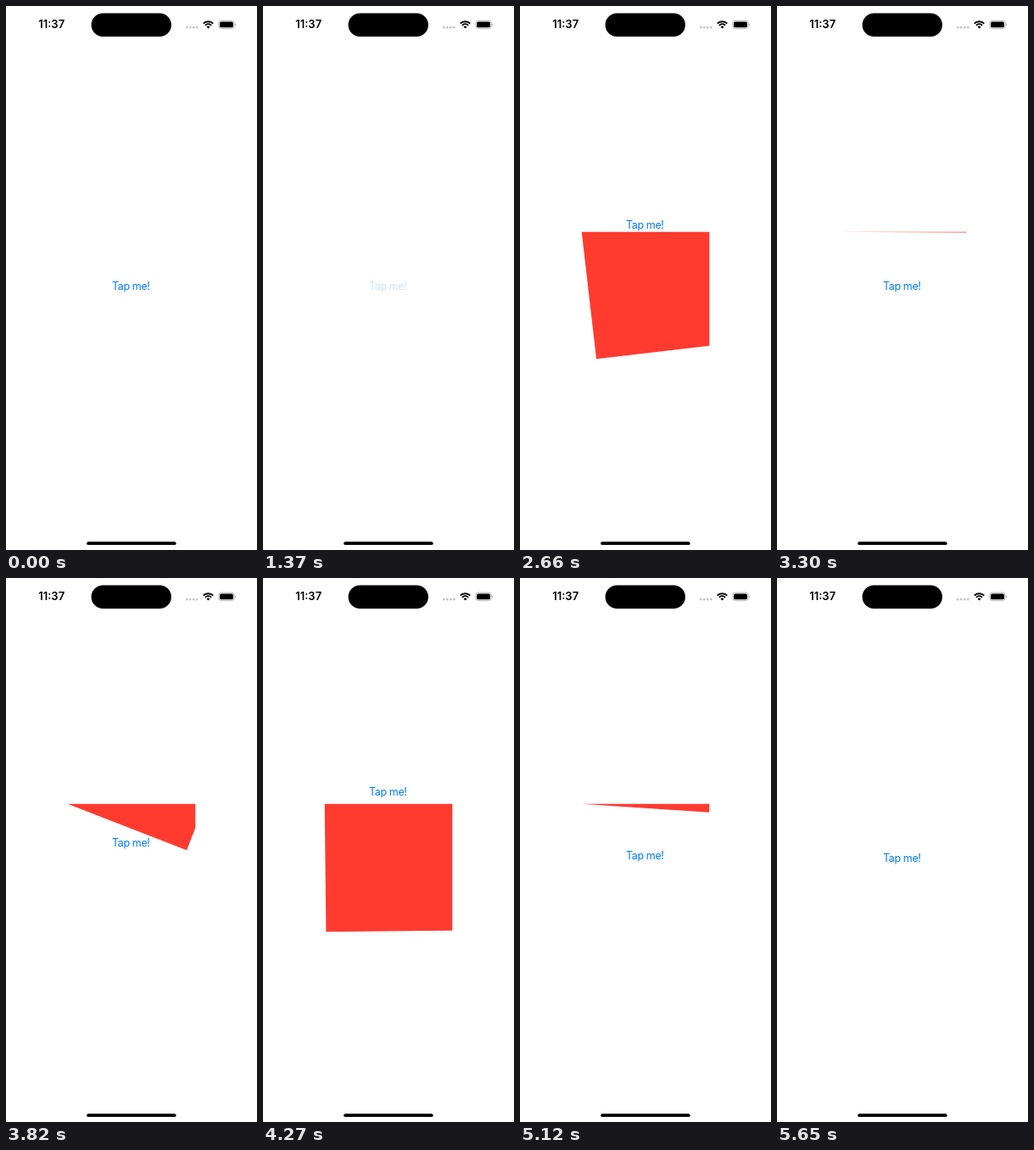
An HTML page that plays this animation: 296x640 px, repeating every 6250 ms.

```html
<!DOCTYPE html>
<html lang="en">
<head>
<meta charset="utf-8">
<title>Pivot transition</title>
<style>
  html, body { margin: 0; width: 100%; height: 100%; overflow: hidden; background: #fff; }
  svg { display: block; width: 296px; height: 640px; }
  text { font-family: Inter, "Noto Sans", sans-serif; text-anchor: middle; }
  .time { font-size: 13px; font-weight: 600; }
  .button { font-size: 12.5px; letter-spacing: -0.4px; fill: #007aff; }
</style>
</head>
<body>
<svg viewBox="0 0 296 640">
  <!-- status bar -->
  <text class="time" x="53.7" y="26.4">11:37</text>
  <rect x="100.6" y="8.5" width="94.3" height="27.6" rx="13.8"/>
  <path d="M213.3 25.2h12.1" fill="none" stroke="#c3c3c5" stroke-width="2.8" stroke-linecap="round" stroke-dasharray="0 4"/>
  <g transform="translate(238.5 26.4)">
    <path d="M-5.8-5.8A8.2 8.2 0 0 1 5.8-5.8M-3.6-3.6A5.1 5.1 0 0 1 3.6-3.6" fill="none" stroke="#000" stroke-width="1.9"/>
    <path d="M0 0L-2-2A2.8 2.8 0 0 1 2-2Z"/>
  </g>
  <rect x="250.7" y="17.2" width="18.6" height="9.4" rx="3" fill="none" stroke="#a6a6a6" stroke-width=".8"/>
  <rect x="252" y="18.5" width="16" height="6.8" rx="1.9"/>
  <path d="M270.2 20.5Q271.3 20.9 271.3 21.9T270.2 23.3Z" fill="#a6a6a6"/>

  <!-- content -->
  <polygon id="square" transform="translate(72.7 265.7)" fill="#ff3b30"/>
  <text id="button" class="button" x="147.3" y="334.1">Tap me!</text>

  <!-- home indicator -->
  <rect x="95.2" y="630.3" width="105.4" height="3.7" rx="1.85"/>
</svg>

<script>
  const LOOP = 6250;
  const PRESS = 1370;
  const STEP = 106.9;                // the picture advances in even steps
  const OMEGA = 2 * Math.PI / 550;   // critically damped spring, 0.55 s response
  const SIZE = 150.6;
  const taps = [1420, 2614, 3641, 4678]; // open, close, open, close

  const square = document.getElementById("square");
  const button = document.getElementById("button");

  function openness(t) {
    const last = taps.findLastIndex(start => start <= t);
    if (last < 0) return 0;
    const x = OMEGA * (t - taps[last]);
    const rest = (1 + x) * Math.exp(-x);
    return last % 2 ? rest : 1 - rest;
  }

  // A square swung about its top left corner, cut off at its own bounds.
  function swungSquare(p) {
    const a = (1 - p) * Math.PI / 2;
    const x = SIZE * Math.sin(a);
    const y = SIZE * Math.cos(a);
    const cut = y - (SIZE - x) * Math.tan(a);
    return `0,0 ${SIZE},0 ${SIZE},${cut} ${x},${y}`;
  }

  function buttonOpacity(t) {
    if (t < PRESS) return 1;
    const release = (t - taps[0]) / 150;
    return 0.21 + 0.79 * Math.min(1, Math.max(0, release));
  }

  function draw() {
    const now = performance.now() % LOOP;
    const t = PRESS + STEP * Math.floor((now - PRESS) / STEP);
    const p = openness(t);
    square.setAttribute("points", swungSquare(p));
    button.setAttribute("transform", `translate(0 ${-78.3 * p})`);
    button.setAttribute("opacity", buttonOpacity(t));
    requestAnimationFrame(draw);
  }
  draw();
</script>
</body>
</html>
```
